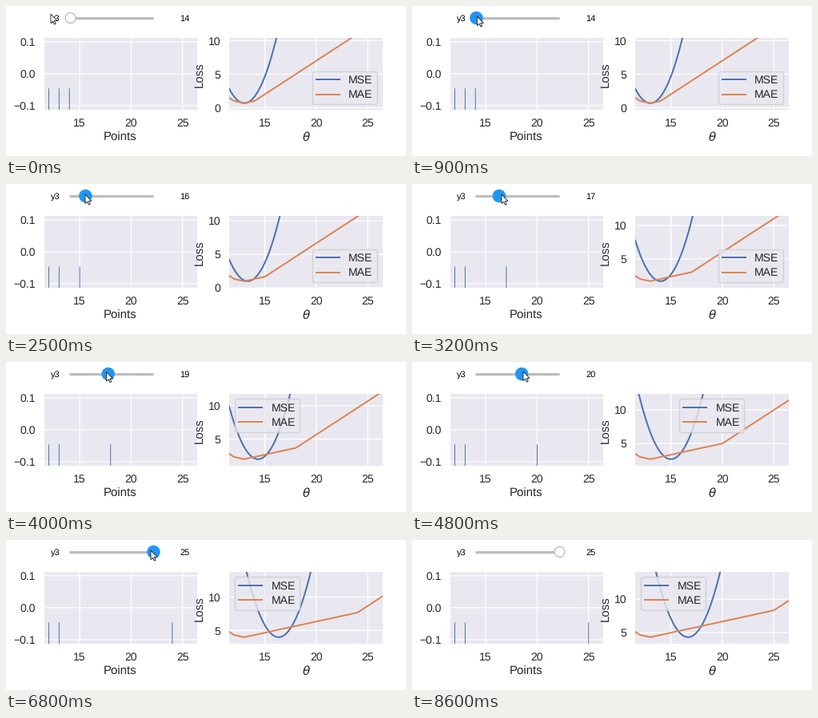
These frames come from a looping animation (500 px wide and 188 px high, 8.7 s). A matplotlib script:

```python
import numpy as np
import matplotlib.pyplot as plt
from matplotlib.animation import FuncAnimation
from matplotlib.patches import Circle, Polygon

W, H, DPI = 500, 188, 100
FRAMES, INTERVAL = 87, 100
PT = 72 / DPI  # points per pixel

BLUE, ORANGE = "#4C72B0", "#DD8452"
PANEL, INK, TRACK, ACTIVE = "#E9E8F0", "#262626", "#BDBDBD", "#2196F3"
TICK, LABEL, SMALL = 13.75 * PT, 15 * PT, 11 * PT

X_LIM = (11.53, 26.42)
TOP, BOTTOM, PANEL_W = 39.5, 130.2, 191.5
TRACK_X, TRACK_Y, STEP = 80, 15, 9.45
FIRST, LAST = 14, 25
PRESS, LEAVE, BLUR = 5, 75, 86
PLOT_LAG = 4  # frames by which the plots trail the slider

plt.rcParams.update({
    "font.family": "Liberation Sans",
    "text.hinting": "none",
    "text.hinting_factor": 1,
})

# Pointer path: frame, x, y
PATH = np.array([
    (0, 56, 10), (3, 79, 13), (7, 79, 13), (12, 85, 13), (16, 86, 13),
    (18, 86, 13), (32, 112, 13), (48, 139, 12), (60, 164, 12),
    (68, 181, 13), (72, 182, 13), (74, 190, 18),
])
ARROW = 0.7 * np.array([
    (0, 0), (0, 16.5), (3.8, 13), (6.3, 18.7), (8.8, 17.6),
    (6.3, 12), (11.5, 12),
])

fig = plt.figure(figsize=(W / DPI, H / DPI), dpi=DPI, facecolor="white")


def panel(left):
    ax = fig.add_axes([left / W, 1 - BOTTOM / H, PANEL_W / W, (BOTTOM - TOP) / H],
                      facecolor=PANEL)
    for spine in ax.spines.values():
        spine.set_visible(False)
    ax.set_axisbelow(True)
    ax.grid(color="white", lw=1.3 * PT, snap=False)
    ax.tick_params(length=0, pad=10.5 * PT, labelsize=TICK, labelcolor=INK)
    ax.set_xlim(*X_LIM)
    ax.set_xticks([15, 20, 25])
    return ax


def mean_abs(t, y3):
    return (abs(t - 12) + abs(t - 13) + abs(t - y3)) / 3


def legend_place(y3):
    if y3 <= 17:
        return "lower right"
    return "upper center" if 20 <= y3 <= 23 else "upper left"


def pointer(i):
    return [np.interp(i, PATH[:, 0], PATH[:, k]) for k in (1, 2)]


def slider_value(i):
    if i <= PRESS:
        return FIRST
    value = round(FIRST + (pointer(i)[0] - TRACK_X) / STEP)
    return int(np.clip(value, FIRST, LAST))


# Data points
points = panel(47.5)
points.set_ylim(-0.1134, 0.1134)
points.set_yticks([-0.1, 0, 0.1], ["\u22120.1", "0.0", "0.1"])
rug = [points.axvline(x, 0, 0.29, color=BLUE, lw=1 * PT, snap=False)
       for x in (12, 13, FIRST)]

# Loss curves
loss = panel(279)
theta = np.linspace(*X_LIM, 180)
mse, = loss.plot([], [], color=BLUE, lw=2 * PT, label="MSE")
mae, = loss.plot([], [], color=ORANGE, lw=2 * PT, label="MAE")
legend = loss.legend(loc="lower right", fontsize=TICK, labelcolor=INK,
                     facecolor=PANEL, edgecolor="0.8", framealpha=0.8,
                     labelspacing=0.39, borderpad=0.37, handlelength=2.1,
                     handletextpad=0.85)

# Slider, axis names and pointer in pixel coordinates
top = fig.add_axes([0, 0, 1, 1], zorder=5)
top.set_xlim(0, W)
top.set_ylim(H, 0)
top.axis("off")
top.text(143, 169, "Points", size=LABEL, color=INK, ha="center")
top.text(375, 169, r"$\theta$", size=LABEL, color=INK, ha="center")
top.text(246, 86, "Loss", size=LABEL, color=INK, rotation=90,
         rotation_mode="anchor", ha="center", va="baseline")
top.text(56, 19, "y3", size=SMALL, color="black")
readout = top.text(217, 19, "", size=SMALL, color="black")
top.plot([TRACK_X - 0.7, TRACK_X + STEP * (LAST - FIRST)], [TRACK_Y] * 2,
         color=TRACK, lw=3.2 * PT, solid_capstyle="butt")
knob = top.add_patch(Circle((TRACK_X, TRACK_Y), 6.5, lw=1.1 * PT, zorder=4))
arrow = top.add_patch(Polygon(ARROW, closed=True, fc="white", ec="#222222",
                              lw=0.9 * PT, zorder=6))


def draw(i):
    value = slider_value(i)
    readout.set_text(str(value))
    active = PRESS <= i < BLUR
    knob.center = (TRACK_X + 0.5 + STEP * (value - FIRST), TRACK_Y)
    knob.set_radius(7.7 if active else 6.5)
    knob.set_facecolor(ACTIVE if active else "white")
    knob.set_edgecolor(ACTIVE if active else "#B0B0B0")
    arrow.set_xy(ARROW + pointer(i))
    arrow.set_visible(i < LEAVE)

    y3 = slider_value(max(i - PLOT_LAG, 0))
    rug[2].set_xdata([y3, y3])
    low = mean_abs(13, y3)
    # Both curves share the same lowest level
    mse.set_data(theta, (theta - (25 + y3) / 3) ** 2 + low)
    mae.set_data(theta, mean_abs(theta, y3))
    loss.set_yticks([0, 5, 10])
    loss.set_ylim(low - 1, low + 9.8)
    legend.set_loc(legend_place(y3))
    return []


anim = FuncAnimation(fig, draw, frames=FRAMES, interval=INTERVAL,
                     init_func=lambda: draw(0), repeat=True, repeat_delay=0,
                     blit=False)
plt.show()
```
